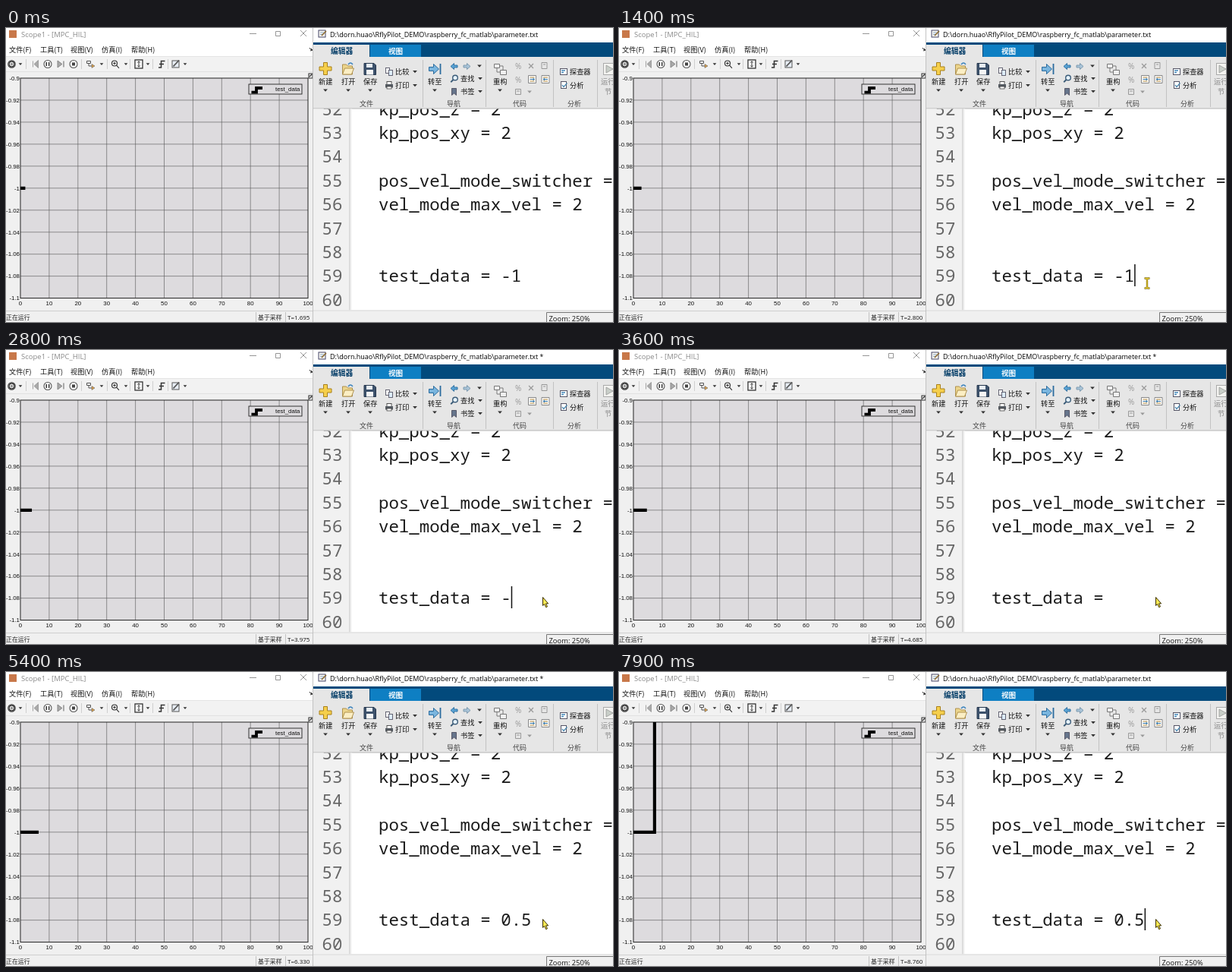
Write an HTML page that moves like this. It is 800 px wide and 387 px high and loops after 8 s.

```html
<!DOCTYPE html>
<html lang="zh">
<head>
<meta charset="utf-8">
<style>
html,body{margin:0;width:100%;height:100%;overflow:hidden;background:#f0f0f0}
svg{display:block;width:100vw;height:100vh}
text{white-space:pre}
.ui{font-family:"Open Sans","Noto Sans CJK SC","Noto Sans CJK JP","Noto Sans CJK",sans-serif}
.cn{font-family:"Noto Sans CJK SC","Noto Sans CJK JP","Noto Sans CJK",sans-serif}
.plot{font-family:"Liberation Sans",Arial,sans-serif;font-size:7.9px;fill:#111}
.code{font-family:"Noto Sans Mono","DejaVu Sans Mono",monospace;font-size:22.4px}
</style>
</head>
<body>
<svg id="stage" viewBox="0 0 800 387" preserveAspectRatio="none"></svg>
<script>
const stage = document.getElementById('stage');
const out = [];
const add = s => out.push(s);
const rect = (x, y, w, h, fill, more = '') =>
  add(`<rect x="${x}" y="${y}" width="${w}" height="${h}" fill="${fill}" ${more}/>`);
const path = (d, stroke, w = 1, fill = 'none', more = '') =>
  add(`<path d="${d}" stroke="${stroke}" stroke-width="${w}" fill="${fill}" ${more}/>`);
const text = (x, y, s, cls, size, fill = '#222', more = '') =>
  add(`<text x="${x}" y="${y}" class="${cls}" ${size ? `font-size="${size}"` : ''} fill="${fill}" ${more}>${s}</text>`);
const ring = (x, y, r, stroke, w = 1, fill = 'none') =>
  add(`<circle cx="${x}" cy="${y}" r="${r}" stroke="${stroke}" stroke-width="${w}" fill="${fill}"/>`);
const drop = (x, y, fill = '#333', r = 2.9) =>
  path(`M${x - r} ${y - r / 2}h${2 * r}l${-r} ${r * 1.1}z`, 'none', 0, fill);

// Plot geometry
const X0 = 19, Y0 = 66, W = 379, H = 289.6;
const px = t => X0 + W * t / 100;
const MID = Y0 + H / 2;
// Code baseline of an editor line
const lineY = n => 114.5 + (n - 52) * 31.4;

function scopeWindow() {
  rect(0, 0, 405, 387, '#f0f0f0');
  rect(0, 0, 405, 38, '#fff');
  rect(4, 3, 10, 10, '#c8784a');
  text(20, 11.5, 'Scope1 - [MPC_HIL]', 'ui', 9.5, '#8a8a8a');
  path('M321 7.5h9M355.5 4.5h6v6h-6zM388 3l8 8M396 3l-8 8', '#8a8a8a', .9);
  ['文件(F)', '工具(T)', '视图(V)', '仿真(I)', '帮助(H)'].forEach((s, i) =>
    text([4, 45, 85, 126, 165][i], 31.5, s, 'cn', 9.2, '#111'));
  path('M400 26q1 3 4 3m-2 -2l2 2l-3 1', '#333', 1);
  rect(0, 38, 405, 19, '#f2f2f2');
  path('M0 37.5H405M0 57.5H405', '#dedede', .8);
  scopeTools();
  path('M399 60h5v6h-5zM400 64l3-3', '#333', 1.1);

  rect(X0, Y0, W, H, '#dddbde');
  let grid = '';
  for (let i = 1; i < 10; i++)
    grid += `M${px(i * 10)} ${Y0}v${H}M${X0} ${Y0 + H * i / 10}h${W}`;
  path(grid, '#555', .6);
  rect(X0, Y0, W, H, 'none', 'stroke="#222" stroke-width="1"');
  for (let i = 0; i <= 10; i++) {
    const v = +(-0.9 - i * .02).toFixed(2);
    text(18, Y0 + H * i / 10 + 2.8, v, 'plot', 0, '#111', 'text-anchor="end"');
    text(px(i * 10), 365, i * 10, 'plot', 0, '#111', 'text-anchor="middle"');
  }
  add('<g clip-path="url(#axes)"><path id="trace" fill="none" stroke="#000" stroke-width="4.2"/></g>');
  rect(320, 74, 70, 13, '#dddbde', 'stroke="#222" stroke-width=".9"');
  path('M323.5 84.7H330V79H338', '#000', 3.8);
  text(355, 83.4, 'test_data', 'plot');

  path('M0 372.5H405', '#cfcfcf', 1);
  text(0, 384, '正在运行', 'cn', 7.9);
  path('M329.5 374v13M368.5 374v13M404.5 0V387', '#bdbdbd', .9);
  text(332, 384, '基于采样', 'cn', 7.9);
  text(371, 384, '', 'ui', 8, '#111', 'id="clock"');
}

function scopeTools() {
  const ink = '#333';
  ring(7.5, 47.5, 3.3, ink, 1.3);
  ring(7.5, 47.5, 4.7, ink, 1.2);
  ring(7.5, 47.5, 1, ink, 1);
  [19, 126, 158, 187, 236].forEach(x => drop(x, 47.5, ink, 2.3));
  path([26.5, 99.5, 133.5, 163.5, 193.5, 213.5].map(x => `M${x} 41v13`).join(''), '#cfcfcf', 1);
  path('M42.5 42.5v10l-5.5-5zM35.500 43.5v8'.replace('.500', '.5'), '#999', .9, '#aaa');
  ring(55, 47.5, 5, '#555', 1.1, '#fafafa');
  path('M53.3 45v5M56.7 45v5', '#333', 1.5);
  path('M68 43v9l6-4.5z', '#777', .8, '#aaa');
  path('M76 43.5v8', '#777', 1.2);
  ring(89, 47.5, 5, '#555', 1.1, '#fafafa');
  rect(87, 45.5, 4, 4, '#444');
  path('M106.5 43.5h5v3h-5zM109 47v3h5', '#555', 1);
  path('M113 47.5v5l4-2.5z', '#666', .6, '#d99c45');
  ring(143, 46.5, 3.5, ink, 1.2);
  path('M145.6 49.2l3.4 3.6M141.3 46.5h3.4M143 44.8v3.4', ink, 1.1);
  rect(170, 42, 10, 11, '#fff', 'stroke="#333" stroke-width="1.3"');
  path('M175 44v7M173.3 45.5l1.7-1.8l1.7 1.8M173.3 49.5l1.7 1.8l1.7-1.8', '#333', 1);
  path('M201 52h3.5v-8.5h5M202 47.5h6', ink, 1.5);
  rect(219, 43, 9, 9, '#e8eef5', 'stroke="#555" stroke-width="1"');
  path('M220.5 50.5l7.5-8', '#555', 1.8);
}

function editorWindow() {
  rect(405, 0, 395, 387, '#fff');
  rect(412, 3, 9, 9, '#f7f7f2', 'stroke="#446" stroke-width="1"');
  path('M414 6h5M414 8.5h3', '#6a8fb5', .8);
  path('M416 10l6-6', '#8b6a32', 1.6);
  text(427, 11.5, 'D:\\dorn.huao\\RflyPilot_DEMO\\raspberry_fc_matlab\\parameter.txt', 'ui', 9, '#000');
  text(703.5, 12, '*', 'ui', 8.5, '#000', 'id="star"');

  const panel = '#e6e6e6';
  rect(405, 19, 395, 19, '#024a7c');
  rect(405, 22, 74, 16, panel);
  rect(480, 22, 67, 16, '#0e7fc3');
  text(428, 33.5, '编辑器', 'cn', 9.8, '#063f69', 'font-weight="700"');
  text(504, 33.5, '视图', 'cn', 9.6, '#fff', 'font-weight="700"');
  rect(405, 38, 395, 68, panel);
  path('M549.5 42v62M632.5 42v62M721.5 42v62M779.5 42v62', '#c2c2c2', 1);
  path('M405 106H800', '#b4b4b4', 1);
  ribbon();

  rect(405, 106.5, 47, 265, '#f1f1f1');
  rect(452, 106.5, 4, 265, 'url(#edge)');
  const lines = {52: 'kp_pos_z = 2', 53: 'kp_pos_xy = 2', 55: 'pos_vel_mode_switcher =', 56: 'vel_mode_max_vel = 2'};
  add('<g clip-path="url(#page)">');
  for (let n = 52; n <= 60; n++) {
    text(416.5, lineY(n), n, 'code', 0, '#666');
    if (lines[n]) text(491, lineY(n), lines[n], 'code', 0, '#1a1a1a');
  }
  text(491, lineY(59), '', 'code', 0, '#1a1a1a', 'id="edit"');
  rect(0, 0, 1.5, 29, '#111', 'id="caret"');
  add('</g>');

  rect(405, 371.5, 395, 16, '#f0f0f0');
  path('M405 372H800', '#d9d9d9', 1);
  path('M712.5 387V374.5H800', '#777', 1);
  text(715.5, 385.5, 'Zoom: 250%', 'ui', 9.4, '#111');
}

function ribbon() {
  const big = (x, s) => {
    text(x, 74, s, 'cn', 9.2, '#111');
    drop(x + 9, 82);
  };
  const small = (x, y, s) => text(x, y, s, 'cn', 9.2, '#111');
  const menu = (x, y, s) => {
    small(x, y, s);
    drop(x + 26, y - 3.5);
  };
  [['文件', 475], ['导航', 590], ['代码', 677], ['分析', 749]].forEach(([s, x]) =>
    text(x, 103, s, 'cn', 9, '#444', 'text-anchor="middle"'));

  big(412, '新建');
  path('M418.5 45.5h5v5.5h5.5v5h-5.5v5.5h-5v-5.5h-5.5v-5h5.5z', '#a8801c', 1, '#f5cf4c');
  big(442, '打开');
  path('M443.5 61V48h5l2 2h6v11z', '#a98a45', .9, '#ecd58c');
  path('M443.5 61l3-8h12l-3 8z', '#a98a45', .9, '#fbeec4');
  path('M451 48q3-4 6 0', '#3c84bd', 1.4);
  big(471, '保存');
  path('M472 46.5h13l2.5 2.5v12.5h-15.5z', '#27384e', 1, '#3d526c');
  rect(475, 47, 8, 5, '#e9eef2');
  rect(475, 55, 9, 6.5, '#f5f5f5');

  menu(513, 61, '比较');
  rect(500.5, 52.5, 5, 7, '#fff', 'stroke="#556" stroke-width=".9"');
  rect(504.5, 55.5, 5, 7, '#dcecf8', 'stroke="#556" stroke-width=".9"');
  menu(513, 79, '打印');
  rect(502, 70.5, 6, 4, '#fff', 'stroke="#444" stroke-width=".9"');
  rect(500, 74, 10, 4.5, '#555b62');
  rect(502, 77, 6, 3, '#fff', 'stroke="#444" stroke-width=".8"');

  big(556, '转至');
  path('M557.5 51.5h6v-4l7 6.5l-7 6.5v-4h-6z', '#2a6b9e', 1, '#79b5de');
  path('M572.5 47v14', '#2a6b9e', 1.8);
  path('M586 50.5l4.5-4v2.5h4.5v3h-4.500v2.5z'.replace('.500', '.5'), '#2a6b9e', .9, '#5aa3d4');
  path('M612 50.5l-4.5-4v2.5h-4.5v3h4.5v2.5z', '#7795ab', .9, '#a9c4d8');
  drop(624, 50);
  menu(599, 70, '查找');
  ring(592, 65.5, 3.3, '#3c5c78', 1.4, '#e5f2fb');
  path('M589.6 68l-3.4 3.3', '#3c5c78', 1.9);
  menu(599, 87, '书签');
  path('M587.5 79.5h6v9l-3-2.5l-3 2.5z', '#445', .8, '#66758c');

  big(642, '重构');
  path('M643.5 47.5h7v5h-7zM651.5 55.5h8v6h-8zM647 53v5h4M655 55v-5h-4', '#777', 1, '#f0f0f0');
  const gray = '#999';
  text(671, 54, '%', 'ui', 10, gray);
  text(671, 71.5, '%', 'ui', 10, gray);
  path('M671.5 80.5h7v7h-7zM673 83h4', gray, 1);
  drop(690, 84, gray);
  path('M689 47l6 6M695 47l-6 6', gray, 1.2);
  path('M706 45.5h7v8h-7zM708 48h3', gray, 1);
  for (const [x, dir] of [[693.5, 1], [711, -1]]) {
    path(`M${x - 5} 62.5h10v10h-10z`, '#888', 1, '#fbfbfb');
    path(`M${x - 3} 65h6M${x - 3} 70h6`, '#b58a3a', 1.1);
    path(`M${x - 3 * dir} 67.5h${6 * dir}m${-2 * dir} -1.5l${2 * dir} 1.5l${-2 * dir} 1.5`, '#3377aa', 1);
  }

  small(743, 61, '探查器');
  rect(730.5, 53.5, 9, 8, '#fff', 'stroke="#556" stroke-width="1"');
  path('M732 56h5M732 58.5h3', '#4488bb', 1.3);
  small(743, 79, '分析');
  rect(731.5, 70.5, 7, 9, '#fff', 'stroke="#556" stroke-width="1"');
  path('M733 75l2 2.5l4.5-5', '#4b88b0', 1.3);
  text(784, 74, '运行', 'cn', 9.2, '#888');
  text(789, 87, '节', 'cn', 9.2, '#888');
  rect(787.5, 46.5, 14, 15, '#f3f3f0', 'stroke="#aaa" stroke-width="1"');
  path('M791 49v10l9-5z', '#999', .8, '#c9cfc9');
}

add(`<defs>
<clipPath id="axes"><rect x="${X0}" y="${Y0}" width="${W}" height="${H}"/></clipPath>
<clipPath id="page"><rect x="405" y="106.5" width="395" height="265"/></clipPath>
<linearGradient id="edge"><stop stop-color="#d2d2d2"/><stop offset="1" stop-color="#fff"/></linearGradient>
</defs>`);
scopeWindow();
editorWindow();
add(`<path id="beam" d="M-3.5 -6.5h2.5l1 1l1-1h2.5M0 -5.5v11M-3.5 6.5h2.5l1-1l1 1h2.5" fill="none" stroke="#7a6510" stroke-width="2.4"/>
<path id="beamIn" d="M-3 -6.5h2l1 1l1-1h2M0 -5.5v11M-3 6.5h2l1-1l1 1h2" fill="none" stroke="#efd42c" stroke-width="1.1"/>
<path id="arrow" d="M0.5 0.5v11l2.2-2l2 4.2l1.8-.9l-2-4h3.2z" fill="#ffec55" stroke="#3a3000" stroke-width="1"/>`);
stage.innerHTML = out.join('');

const el = id => document.getElementById(id);
const [trace, clock, star, edit, caret, beam, beamIn, arrow] =
  ['trace', 'clock', 'star', 'edit', 'caret', 'beam', 'beamIn', 'arrow'].map(el);
const show = (node, on) => node.setAttribute('visibility', on ? 'visible' : 'hidden');
const place = (node, [x, y]) => node.setAttribute('transform', `translate(${x} ${y})`);

const LOOP = 8000, STEP_AT = 7.36, CHAR = 13.44;
const simTime = [[0, 1.695], [700, 2.245], [2100, 3.355], [3600, 4.685], [5400, 6.33], [6600, 7.385], [7900, 8.76]];
const stalls = [50, 53, 57, 58, 60, 72, 74, 75, 77, 78];
const typed = [[0, '-1'], [2600, '-'], [2900, ''], [3900, '0'], [4200, '0.'], [4600, '0.5']];
const blinks = [[300, 1000], [1300, 1900], [2400, 3400], [3900, 4900], [5500, 6100], [6700, 7300], [7900, 8000]];
const mouse = [[300, 770, 372], [600, 696, 336], [1500, 696, 336], [1900, 707, 325]];

function along(keys, t) {
  if (t <= keys[0][0]) return keys[0].slice(1);
  for (let i = 1; i < keys.length; i++) {
    const [a, ...p] = keys[i - 1], [b, ...q] = keys[i];
    if (t <= b) return p.map((v, k) => v + (q[k] - v) * (t - a) / (b - a));
  }
  return keys[keys.length - 1].slice(1);
}

function draw(ms) {
  let tick = Math.floor(ms / 100);
  const t = tick * 100;
  while (stalls.includes(tick)) tick--;

  const sim = Math.round(along(simTime, tick * 100)[0] * 200) / 200;
  clock.textContent = 'T=' + sim.toFixed(3);
  trace.setAttribute('d', `M${X0} ${MID}H${px(Math.min(sim, STEP_AT))}` + (sim >= STEP_AT ? 'V40' : ''));

  const value = typed.filter(k => k[0] <= t).pop()[1];
  edit.textContent = 'test_data = ' + value;
  show(star, t >= 2600 && t < 5500);

  const below = t < 1300;
  show(caret, blinks.some(([a, b]) => t >= a && t < b));
  place(caret, below ? [491.2, 342.5] : [491 + CHAR * (12 + value.length), 311]);

  const pos = along(mouse, t), pointing = t >= 1900;
  [beam, beamIn, arrow].forEach(m => place(m, pos));
  show(beam, t >= 300 && !pointing);
  show(beamIn, t >= 300 && !pointing);
  show(arrow, pointing);
}

function loop() {
  draw(performance.now() % LOOP);
  requestAnimationFrame(loop);
}
loop();
</script>
</body>
</html>
```
